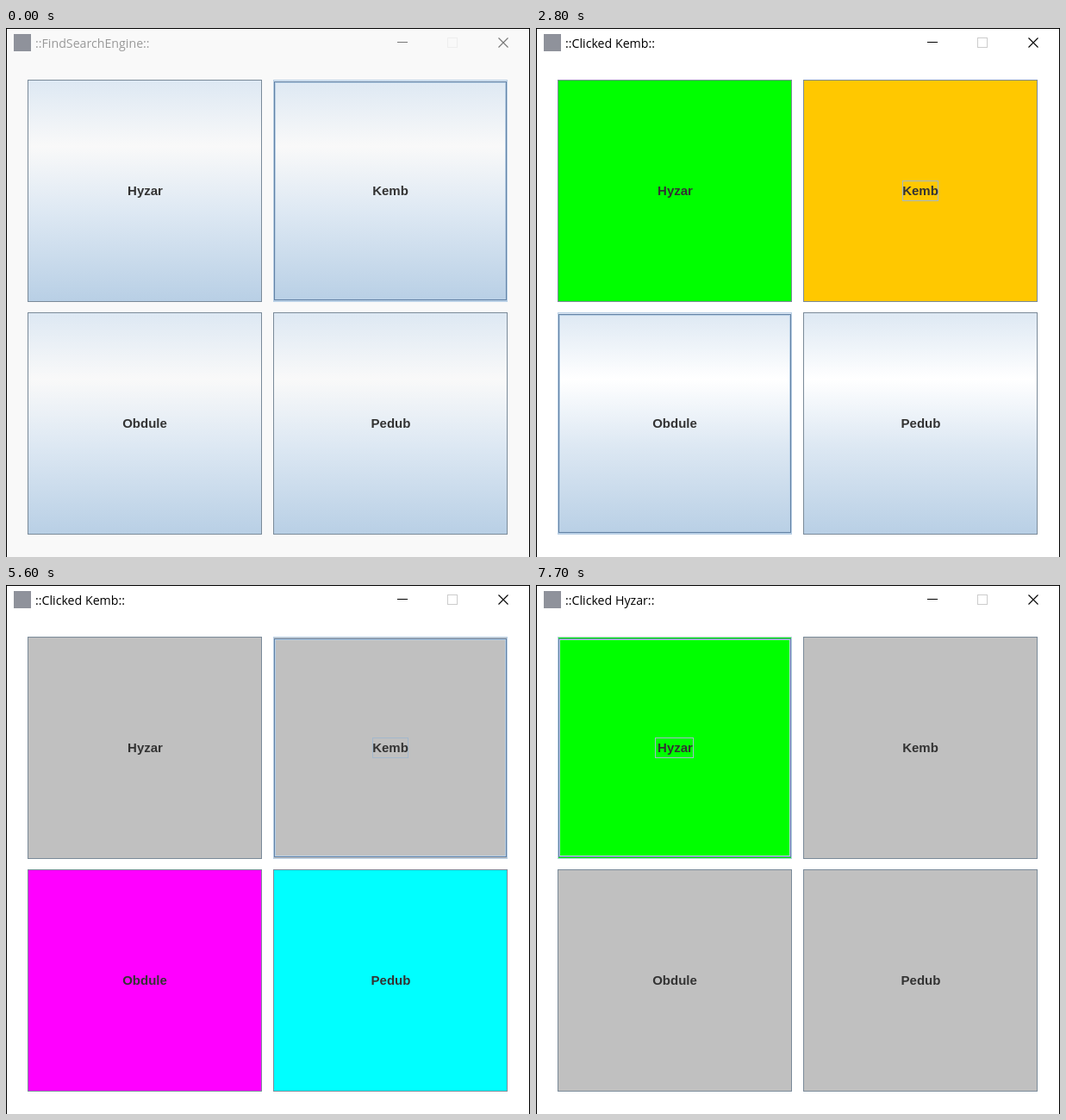
These frames come from a looping animation (608 px wide and 614 px high, 8000 ms). An HTML page:

```html
<!DOCTYPE html>
<html lang="en">
<head>
<meta charset="utf-8">
<title>Search engine buttons</title>
<style>
  html, body { margin: 0; width: 100%; height: 100%; overflow: hidden; background: #fff; }
  svg { display: block; }
  .title { font: 14.2px "Open Sans", sans-serif; }
  .label { font: bold 15px "Liberation Sans", Arial, sans-serif; fill: #333; text-anchor: middle; }
</style>
</head>
<body>
<svg id="stage" width="608" height="614" viewBox="0 0 608 614" shape-rendering="crispEdges"></svg>
<script>
const LOOP = 8000, W = 272, H = 258;
const IDLE = "url(#ocean)", GRAY = "#c0c0c0", PRESS = "#b8cfe5", EDGE = "#7a8a99";

const BUTTONS = [
  { name: "Hyzar", x: 25, y: 60, cx: 161.5, focusX: 138, focusW: 45, color: "#00ff00" },
  { name: "Kemb", x: 310, y: 60, cx: 446, focusX: 425, focusW: 42, color: "#ffc800" },
  { name: "Obdule", x: 25, y: 330, cx: 161, focusX: 133, focusW: 55, color: "#ff00ff" },
  { name: "Pedub", x: 310, y: 330, cx: 446.5, focusX: 422, focusW: 48, color: "#00ffff" }
];

// [time, action, button]; button -1 means none
const EVENTS = [
  [0, "hover", 1], [100, "hover", 0], [1100, "click", 0],
  [1700, "hover", 1], [2200, "press", 1], [2300, "click", 1],
  [2800, "hover", 2], [3000, "press", 2], [3100, "click", 2],
  [3400, "hover", 3], [3900, "press", 3], [4000, "click", 3],
  [4400, "hover", -1], [4500, "hover", 0], [4800, "click", 0],
  [5000, "hover", 1], [5600, "click", 1],
  [5800, "hover", 2], [6200, "press", 2], [6300, "click", 2],
  [6400, "hover", 3], [7000, "click", 3],
  [7300, "hover", 0], [7700, "click", 0]
];

const stage = document.getElementById("stage");

function add(tag, attrs, parent = stage) {
  const el = document.createElementNS("http://www.w3.org/2000/svg", tag);
  set(el, attrs);
  return parent.appendChild(el);
}

function set(el, attrs) {
  for (const key in attrs) el.setAttribute(key, attrs[key]);
}

function show(el, on) {
  el.setAttribute("visibility", on ? "visible" : "hidden");
}

// One-pixel outline covering the pixels x..x+w, y..y+h
function frame(x, y, w, h, stroke, parent) {
  return add("rect", { x: x + 0.5, y: y + 0.5, width: w - 1, height: h - 1, fill: "none", stroke }, parent);
}

const ocean = add("linearGradient", { id: "ocean", x1: 0, y1: 0, x2: 0, y2: 1 }, add("defs", {}));
const stops = [[0, "#dde8f3"], [0.3, "#fff"], [0.6, "#dde8f3"], [1, "#b8cfe5"]].map(
  ([offset, color]) => add("stop", { offset, "stop-color": color }, ocean));

const back = add("rect", { width: 608, height: 614 });
add("path", { d: "M0.5 614V0.5H607.5V614", fill: "none", stroke: "#000" });
add("rect", { x: 9, y: 7, width: 20, height: 20, fill: "#8f929b" });
const title = add("text", { class: "title", x: 34, y: 23 });
const minimize = add("path", { d: "M454 16.5H466", fill: "none" });
const maximize = frame(512, 11, 12, 12, "#ccc");
const close = add("path", { d: "M571.5 11.5L582.5 22.5M582.5 11.5L571.5 22.5", fill: "none",
  "shape-rendering": "auto", "stroke-width": 1.1 });

const views = BUTTONS.map(b => {
  const { x, y } = b;
  const face = add("rect", { x, y, width: W, height: H });
  const plain = frame(x, y, W, H, EDGE);
  const over = add("g", {});
  frame(x, y, W, H, "#b8cfe5", over);
  frame(x + 1, y + 2, W - 2, H - 4, "#6382a5", over);
  frame(x + 2, y + 3, W - 4, H - 6, "#b8cfe5", over);
  const sunk = add("path", { fill: EDGE,
    d: `M${x} ${y}h${W}v${H}h${-W}zm2 3v${H - 4}h${W - 3}v${4 - H}z`, "fill-rule": "evenodd" });
  const focus = frame(b.focusX, y + 117, b.focusW, 24, "#a3b8cc");
  add("text", { class: "label", x: b.cx, y: y + 134 }).textContent = b.name;
  return { face, plain, over, sunk, focus };
});

function stateAt(t) {
  const s = { hover: -1, pressed: -1, focus: -1, clicked: -1, fills: BUTTONS.map(() => IDLE) };
  for (const [time, action, i] of EVENTS) {
    if (time > t) break;
    if (action === "hover") s.hover = i;
    if (action === "press") s.pressed = s.focus = i;
    if (action === "click") {
      s.pressed = -1;
      s.focus = s.clicked = i;
      s.fills[i] = s.fills[i] === BUTTONS[i].color ? GRAY : BUTTONS[i].color;
    }
  }
  return s;
}

function draw(t) {
  const s = stateAt(t);
  const active = s.clicked >= 0;
  const vivid = s.fills.some(f => f !== IDLE && f !== GRAY);
  const white = vivid ? "#fff" : "#f9f9f9";
  set(back, { fill: white });
  set(stops[1], { "stop-color": white });
  set(title, { fill: active ? "#000" : "#999" });
  title.textContent = active ? `::Clicked ${BUTTONS[s.clicked].name}::` : "::FindSearchEngine::";
  set(minimize, { stroke: active ? "#000" : "#777" });
  set(close, { stroke: active ? "#000" : "#777" });
  set(maximize, { stroke: !active ? "#eee" : vivid ? "#ccc" : "#ddd" });
  views.forEach((v, i) => {
    const pressed = s.pressed === i, over = s.hover === i && !pressed;
    set(v.face, { fill: pressed ? PRESS : s.fills[i] });
    show(v.plain, !pressed && !over);
    show(v.over, over);
    show(v.sunk, pressed);
    show(v.focus, s.focus === i);
  });
}

const start = performance.now();
function tick() {
  draw((performance.now() - start) % LOOP);
  requestAnimationFrame(tick);
}
tick();
</script>
</body>
</html>
```
